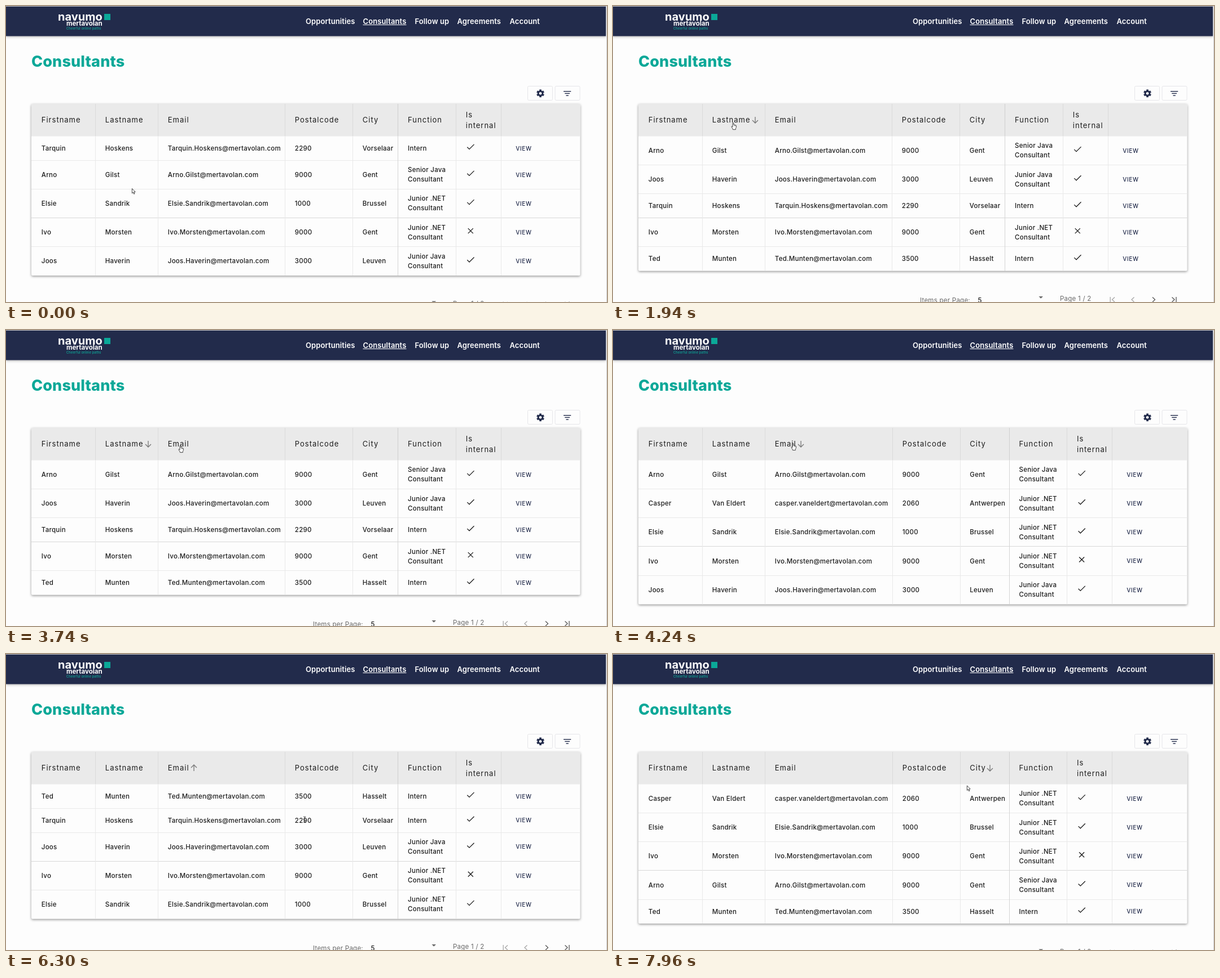
Write an HTML page with a canvas that moves like this. It is 1065x526 px and loops after 8000 ms.

```html
<!DOCTYPE html>
<html lang="en">
<head>
<meta charset="utf-8">
<title>Consultants</title>
<style>
  html, body { margin: 0; width: 100%; height: 100%; overflow: hidden; background: #fdfdfd; }
  canvas { display: block; width: 1065px; height: 526px; }
</style>
</head>
<body>
<canvas id="stage"></canvas>
<script>
const W = 1065, H = 526, LOOP = 8000;
const NAVY = '#222b4b', TEAL = '#0ba898', PAPER = '#fdfdfd', INK = '#1c1c1c';
const canvas = document.getElementById('stage');
const ctx = canvas.getContext('2d');
const ratio = window.devicePixelRatio || 1;
canvas.width = W * ratio;
canvas.height = H * ratio;

const DOMAIN = '@mertavolan.com';
const person = (first, last, zip, city, job, internal = true, mail = first + '.' + last) =>
  ({ first, last, zip, city, job, internal, mail: mail + DOMAIN });

const people = {
  tarquin: person('Tarquin', 'Hoskens', '2290', 'Vorselaar', ['Intern']),
  arno: person('Arno', 'Gilst', '9000', 'Gent', ['Senior Java', 'Consultant']),
  elsie: person('Elsie', 'Sandrik', '1000', 'Brussel', ['Junior .NET', 'Consultant']),
  ivo: person('Ivo', 'Morsten', '9000', 'Gent', ['Junior .NET', 'Consultant'], false),
  joos: person('Joos', 'Haverin', '3000', 'Leuven', ['Junior Java', 'Consultant']),
  ted: person('Ted', 'Munten', '3500', 'Hasselt', ['Intern']),
  casper: person('Casper', 'Van Eldert', '2060', 'Antwerpen', ['Junior .NET', 'Consultant'], true, 'casper.vaneldert')
};

// Table states; the long address and city widen some columns.
const states = [
  { from: 0, rows: 'tarquin arno elsie ivo joos' },
  { from: 1940, rows: 'arno joos tarquin ivo ted', arrow: [252, 1] },
  { from: 4080, rows: 'arno casper elsie ivo joos', arrow: [333, 1], wide: true },
  { from: 4640, rows: 'ted tarquin joos ivo elsie', arrow: [333, -1] },
  { from: 7460, rows: 'casper elsie ivo arno ted', arrow: [668, 1], wide: true }
];
const NARROW = [45.5, 158.5, 269.5, 494.5, 614.5, 694.8, 797.5, 877.5];
const WIDE = [45.5, 158.5, 269.5, 495.5, 615, 702.3, 804.8, 884.5];
const HEADS = ['Firstname', 'Lastname', 'Email', 'Postalcode', 'City', 'Function'];
const TOP = 174, BODY = 231.5, RIGHT = 1017.5, SINGLE = 42.8, DOUBLE = 51.2;

// Pointer hotspot: time, x, y, shape until the next key.
const track = [
  [0, 223, 324, 'arrow'], [960, 223, 324, 'arrow'],
  [1230, 219, 262, 'beam'], [1340, 217, 244, 'arrow'], [1480, 214, 212, 'hand'],
  [1630, 213, 207, 'hand'], [2600, 213, 207, 'hand'],
  [2660, 215, 214, 'arrow'], [3010, 230, 267.5, 'arrow'],
  [3280, 230, 267.5, 'arrow'], [3400, 250, 270, 'arrow'], [3560, 286, 236, 'arrow'],
  [3690, 306, 209, 'hand'], [3740, 309, 205, 'hand'], [4080, 309, 205, 'hand'],
  [4240, 319, 201, 'hand'], [4950, 319, 201, 'hand'],
  [5010, 321, 211, 'arrow'], [5140, 329, 247, 'beam'], [5210, 333, 260, 'arrow'],
  [5310, 339, 289, 'beam'], [5350, 341, 295, 'beam'], [6040, 341, 295, 'beam'],
  [6110, 395, 303, 'arrow'], [6180, 450, 304, 'arrow'], [6270, 515, 297, 'beam'],
  [6300, 529, 294, 'beam'], [6370, 543, 285, 'arrow'], [6500, 561, 261, 'arrow'],
  [6790, 579.5, 227.5, 'arrow'], [6850, 579.5, 227.5, 'arrow'],
  [6970, 630, 205, 'hand'], [7030, 646, 197, 'hand'], [7850, 646, 197, 'hand'],
  [7890, 638, 211, 'arrow'], [7960, 627, 233.5, 'arrow'], [LOOP, 627, 233.5, 'arrow']
];

function text(str, x, y, { size = 11.5, weight = 500, gap = 0.25, color = INK } = {}) {
  ctx.font = `${weight} ${size}px Inter, "Open Sans", sans-serif`;
  ctx.letterSpacing = gap + 'px';
  ctx.fillStyle = color;
  ctx.fillText(str, x, y);
}

function rect(x, y, w, h, color) {
  ctx.fillStyle = color;
  ctx.fillRect(x, y, w, h);
}

function line(points, color, width = 1) {
  ctx.beginPath();
  points.forEach(([x, y], i) => i ? ctx.lineTo(x, y) : ctx.moveTo(x, y));
  ctx.strokeStyle = color;
  ctx.lineWidth = width;
  ctx.stroke();
}

function shadowed(blur, dy, alpha, draw) {
  ctx.save();
  ctx.shadowColor = `rgba(0,0,0,${alpha})`;
  ctx.shadowBlur = blur * ratio;
  ctx.shadowOffsetY = dy * ratio;
  draw();
  ctx.restore();
}

function drawNav() {
  shadowed(4, 1.5, 0.27, () => rect(0, 1, 1063, 52.5, NAVY));
  rect(0, 0, W, 1, '#c9c9cc');
  text('navumo', 92, 26, { size: 20, weight: 700, gap: 0, color: '#fff' });
  text('mertavolan', 107, 35, { size: 11.5, weight: 700, gap: 0, color: '#fff' });
  text('Cheerful online paths', 107, 42, { size: 5.8, gap: 0.1, color: TEAL });
  rect(174, 14, 11, 11, TEAL);

  const style = { size: 13, weight: 600, gap: 0.1, color: '#fff' };
  [['Opportunities', 531], ['Consultants', 632.5], ['Follow up', 724.5],
   ['Agreements', 799.5], ['Account', 892.5]].forEach(([label, x]) => {
    text(label, x, 32, style);
    if (label === 'Consultants') rect(x, 33, ctx.measureText(label).width, 1, '#fff');
  });
}

function drawGear(x, y) {
  ctx.save();
  ctx.translate(x, y);
  ctx.fillStyle = NAVY;
  ctx.beginPath();
  ctx.arc(0, 0, 5.2, 0, Math.PI * 2);
  ctx.fill();
  for (let i = 0; i < 6; i++) {
    ctx.fillRect(-1.8, -6.9, 3.6, 4);
    ctx.rotate(Math.PI / 3);
  }
  ctx.fillStyle = PAPER;
  ctx.beginPath();
  ctx.arc(0, 0, 2.4, 0, Math.PI * 2);
  ctx.fill();
  ctx.restore();
}

function drawTools() {
  ctx.strokeStyle = '#e6e6e9';
  ctx.lineWidth = 1;
  [924.5, 973].forEach(x => {
    ctx.beginPath();
    ctx.roundRect(x, 142.5, 44, 25, 2);
    ctx.stroke();
  });
  drawGear(947, 155.3);
  [6.6, 4.4, 2.2].forEach((half, i) => rect(994.6 - half, 151 + i * 3.7, half * 2, 1.4, NAVY));
}

function drawSortArrow(x, dir) {
  const y = 202.5;
  line([[x, y - 5.5 * dir], [x, y + 5 * dir]], '#757575', 1.3);
  line([[x - 5, y + 0.5 * dir], [x, y + 5.5 * dir], [x + 5, y + 0.5 * dir]], '#757575', 1.3);
}

function drawMark(x, y, yes) {
  if (yes) {
    line([[x - 6, y + 0.5], [x - 2.3, y + 4.2], [x + 6.2, y - 4.3]], INK, 1.3);
  } else {
    line([[x - 4.5, y - 4.5], [x + 4.5, y + 4.5]], INK, 1.3);
    line([[x + 4.5, y - 4.5], [x - 4.5, y + 4.5]], INK, 1.3);
  }
}

function drawRow(p, cols, mid) {
  const base = mid + 3.8;
  [p.first, p.last, p.mail, p.zip, p.city].forEach((value, i) => text(value, cols[i] + 17.3, base));
  p.job.forEach((part, i) => text(part, cols[5] + 17.3, base + (i - (p.job.length - 1) / 2) * 17));
  drawMark(cols[6] + 25.8, mid - 2.7, p.internal);
  text('VIEW', cols[7] + 25.7, base - 0.2, { size: 10, gap: 0.65, color: NAVY });
}

function drawTable(state) {
  const cols = state.wide ? WIDE : NARROW;
  const rows = state.rows.split(' ').map(key => people[key]);
  const bottom = rows.reduce((y, p) => y + (p.job.length > 1 ? DOUBLE : SINGLE), BODY);

  shadowed(4, 1.5, 0.42, () => {
    ctx.fillStyle = PAPER;
    ctx.beginPath();
    ctx.roundRect(45, TOP, RIGHT - 45, bottom - TOP, 2);
    ctx.fill();
  });
  rect(45, TOP, RIGHT - 45, BODY - TOP, '#eaeaea');

  let y = BODY;
  rows.forEach((p, i) => {
    const height = p.job.length > 1 ? DOUBLE : SINGLE;
    if (i) rect(45, Math.round(y - 0.6), RIGHT - 45, 1, i === 3 ? '#d8d8d8' : '#e9e9e9');
    drawRow(p, cols, y + height / 2);
    y += height;
  });
  cols.slice(1).forEach((x, i) => {
    const left = Math.floor(x);
    const dark = i === 4;
    rect(left, TOP, 1, BODY - TOP, dark ? '#cfcfcf' : '#dadada');
    rect(left, BODY, 1, bottom - BODY, dark ? '#d4d4d4' : '#e9e9e9');
  });

  const style = { size: 13, weight: 400, gap: 1 };
  HEADS.forEach((label, i) => text(label, cols[i] + 17.3, 207, style));
  text('Is', cols[6] + 17.3, 197.5, style);
  text('internal', cols[6] + 17.3, 216.8, style);
  if (state.arrow) drawSortArrow(...state.arrow);
  return bottom;
}

function drawPager(bottom) {
  const grey = '#686868', pale = '#a6a6a6';
  text('Items per Page:', 544, bottom + 56, { weight: 400, color: grey });
  text('5', 646.5, bottom + 56);
  text('Page 1 / 2', 792, bottom + 53.7, { weight: 400, color: grey });

  ctx.fillStyle = grey;
  ctx.beginPath();
  ctx.moveTo(754.5, bottom + 45.3);
  ctx.lineTo(762, bottom + 45.3);
  ctx.lineTo(758.2, bottom + 49);
  ctx.fill();

  const y = bottom + 51;
  const chevron = (x, dir, color) =>
    line([[x - 2 * dir, y - 4.2], [x + 2.5 * dir, y], [x - 2 * dir, y + 4.2]], color, 1.3);
  const bar = (x, color) => line([[x, y - 4.7], [x, y + 4.7]], color, 1.3);
  bar(881.2, pale);
  chevron(887, -1, pale);
  chevron(921.5, -1, pale);
  chevron(958, 1, '#555');
  chevron(992.5, 1, '#555');
  bar(998, '#555');
}

function outline(points) {
  ctx.beginPath();
  points.forEach(([x, y], i) => i ? ctx.lineTo(x, y) : ctx.moveTo(x, y));
  ctx.closePath();
  ctx.fillStyle = '#fff';
  ctx.fill();
  ctx.strokeStyle = '#333';
  ctx.lineWidth = 0.9;
  ctx.lineJoin = 'round';
  ctx.stroke();
}

const pointers = {
  arrow() {
    outline([[0.4, 0.4], [0.4, 8.8], [2.3, 7.1], [3.7, 10.2], [5, 9.6], [3.7, 6.6], [6.2, 6.4]]);
  },
  hand() {
    outline([[-0.9, 1], [0, 0.3], [0.9, 1], [0.9, 4.2], [2.6, 4.3], [4.2, 4.8], [5.4, 5.6],
      [5.4, 8.6], [4.3, 10.7], [4.3, 12.6], [-0.6, 12.6], [-1, 10.9], [-3.1, 7.6], [-2.5, 6.6], [-0.9, 7.8]]);
    line([[2.3, 4.6], [2.3, 6.6]], '#333', 0.6);
    line([[3.9, 5], [3.9, 6.8]], '#333', 0.6);
  },
  beam() {
    line([[0, -4.5], [0, 4.5]], '#333', 1);
    line([[-2.2, -4.8], [-0.5, -4.8], [0, -4.3], [0.5, -4.8], [2.2, -4.8]], '#333', 0.9);
    line([[-2.2, 4.8], [-0.5, 4.8], [0, 4.3], [0.5, 4.8], [2.2, 4.8]], '#333', 0.9);
  }
};

function drawPointer(t) {
  const i = track.findIndex((key, n) => n && t < key[0]);
  const [t0, x0, y0, shape] = track[i - 1];
  const [t1, x1, y1] = track[i];
  const k = (t - t0) / (t1 - t0);
  ctx.save();
  ctx.translate(x0 + (x1 - x0) * k, y0 + (y1 - y0) * k);
  pointers[shape]();
  ctx.restore();
}

function frame(now) {
  const t = Math.max(0, now) % LOOP;
  ctx.setTransform(ratio, 0, 0, ratio, 0, 0);
  rect(0, 0, W, H, PAPER);
  drawNav();
  text('Consultants', 45, 108.3, { size: 27, weight: 800, gap: 0.15, color: TEAL });
  drawTools();
  drawPager(drawTable(states.findLast(s => t >= s.from)));
  rect(1064, 0, 1, H, '#c9c9cc');
  drawPointer(t);
  requestAnimationFrame(frame);
}
requestAnimationFrame(frame);
</script>
</body>
</html>
```
